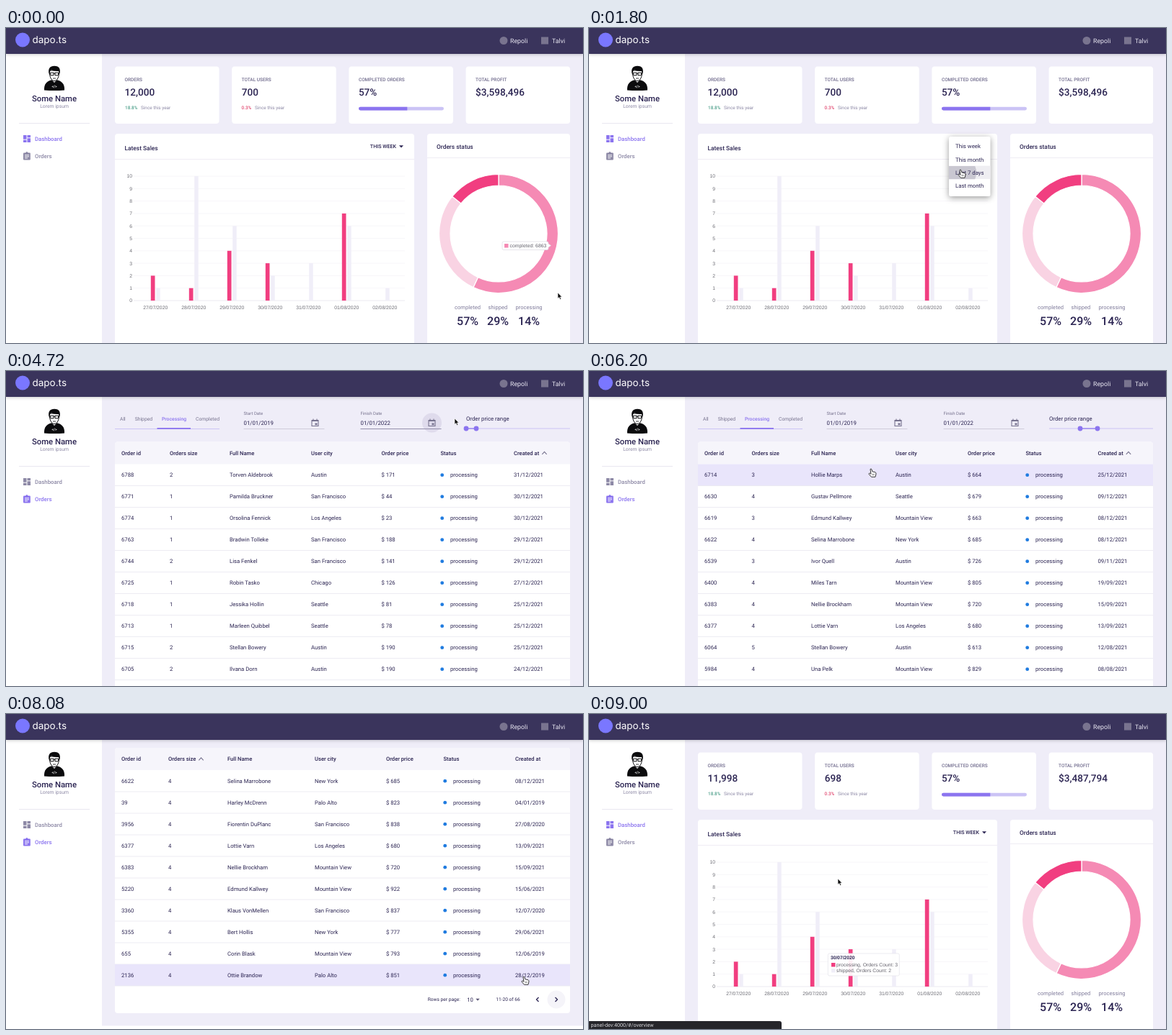
Recreate the animation shown at these times as an HTML page. Size 800 by 438 pixels, loop 9.04 s.

```html
<!DOCTYPE html>
<html lang="en">
<head>
<meta charset="utf-8">
<title>Sales dashboard</title>
<style>
  html, body { margin: 0; width: 100%; height: 100%; overflow: hidden; background: #efedf8; }
  svg { display: block; width: 800px; height: 438px; font-family: Roboto, sans-serif; text-rendering: geometricPrecision; }
  .plain { font-family: "Liberation Sans", sans-serif; }
  .logo { font-family: Inter, sans-serif; }
</style>
</head>
<body>
<svg id="stage" viewBox="0 0 800 438"></svg>
<script>
const LOOP = 9040;
const INK = '#2b2452', MUTED = '#8d89a6', PURPLE = '#8b74ef', PALE = '#cbc3f5';
const PINK = '#f13e80', PINK_MID = '#f58ab4', PINK_PALE = '#f9d3e3', LINE = '#efedf4';
const OPEN_MENU = 1240, PICK = 1700, CLOSE_MENU = 1960;
const TO_ORDERS = 3320, PICK_TAB = 4160, TO_DASHBOARD = 8560;

// Cursor stops: time, x, y
const CURSOR = [
  [0, 765, 368], [360, 765, 368], [800, 640, 250], [1160, 525, 163], [1300, 525, 163],
  [1700, 516, 202], [1900, 516, 202], [2350, 470, 300], [2700, 366, 330], [3080, 130, 230],
  [3260, 52, 180], [3500, 52, 180], [4050, 232, 67], [4250, 232, 67], [4560, 590, 72],
  [4720, 622, 66], [5000, 652, 80], [5100, 652, 80], [5400, 705, 80], [5480, 705, 80],
  [5570, 638, 80], [5600, 638, 80], [5850, 681, 80], [5920, 681, 80], [6200, 392, 141],
  [6500, 248, 114], [6700, 248, 114], [7000, 378, 279], [7450, 378, 279], [7640, 763, 397],
  [7760, 763, 397], [8080, 719, 370], [8460, 52, 154], [8640, 52, 154], [9000, 345, 229], [LOOP, 345, 229]
];

const CITIES = { A: 'Austin', S: 'San Francisco', L: 'Los Angeles', C: 'Chicago', E: 'Seattle', M: 'Mountain View', N: 'New York', P: 'Palo Alto' };
const HEADS = ['Order id', 'Orders size', 'Full Name', 'User city', 'Order price', 'Status', 'Created at'];

const parse = block => block.trim().split('\n').map(line => line.trim().split('|'));
const CHEAP = parse(`
  6788|2|Torven Aldebrook|A|171|31/12/2021
  6771|1|Pamilda Bruckner|S|44|30/12/2021
  6774|1|Orsolina Fennick|L|23|30/12/2021
  6763|1|Bradwin Tolleke|S|188|29/12/2021
  6744|2|Lisa Fenkel|S|141|29/12/2021
  6725|1|Robin Tasko|C|126|27/12/2021
  6718|1|Jessika Hollin|E|81|25/12/2021
  6713|1|Marleen Quibbel|E|78|25/12/2021
  6715|2|Stellan Bowery|A|190|25/12/2021
  6705|2|Ilvana Dorn|A|190|24/12/2021`);
const PRICEY = parse(`
  6714|3|Hollie Marps|A|664|25/12/2021
  6630|4|Gustav Pellmore|E|679|09/12/2021
  6619|3|Edmund Kallwey|M|663|08/12/2021
  6622|4|Selina Marrobone|N|685|08/12/2021
  6539|3|Ivor Quell|A|726|09/11/2021
  6400|4|Miles Tarn|M|805|19/09/2021
  6383|4|Nellie Brockham|M|720|15/09/2021
  6377|4|Lottie Varn|L|680|13/09/2021
  6064|5|Stellan Bowery|A|613|12/08/2021
  5984|4|Una Pelk|M|829|08/08/2021`);
const LARGEST = parse(`
  191|7|Cornelius Quell|S|798|05/02/2019
  1169|6|Weston Drabicek|L|685|17/07/2019
  2224|5|Florentina Bassio|L|705|02/01/2020
  4622|5|Bartholin Weems|E|695|29/01/2021
  5429|5|Sol Hibber|L|687|02/07/2021
  3604|5|Lennor Weems|P|849|01/08/2020
  5949|5|Garvett Solis|N|749|08/08/2021
  281|5|Jed Lomar|M|801|28/02/2019
  6064|5|Stellan Bowery|A|613|12/08/2021
  4403|4|Ingrid Falbert|S|657|28/12/2020`);
const SECOND = parse(`
  6622|4|Selina Marrobone|N|685|08/12/2021
  39|4|Harley McDrenn|P|823|04/01/2019
  3956|4|Fiorentin DuPlanc|S|838|27/08/2020
  6377|4|Lottie Varn|L|680|13/09/2021
  6383|4|Nellie Brockham|M|720|15/09/2021
  5220|4|Edmund Kallwey|M|922|15/06/2021
  3360|4|Klaus VonMellen|S|837|12/07/2020
  5355|4|Bert Hollis|N|777|29/06/2021
  655|4|Corin Blask|M|793|12/06/2019
  2136|4|Ottie Brandow|P|851|28/12/2019`);

const COLS_CHEAP = [160, 227, 310, 423, 520.5, 602.5, 704];
const COLS_PRICEY = [160, 225.5, 308, 425, 525, 605.5, 705.5];
const COLS_SECOND = [160, 225, 307, 428, 527, 606.5, 706];
// Table views: end time, rows, column positions, sorted column
const VIEWS = [
  [PICK_TAB, CHEAP, COLS_CHEAP, 6], [5880, CHEAP, COLS_CHEAP, 6], [6640, PRICEY, COLS_PRICEY, 6],
  [7720, LARGEST, COLS_PRICEY, 1], [LOOP, SECOND, COLS_SECOND, 1]
];

const clamp = v => Math.max(0, Math.min(1, v));
const mix = (a, b, p) => a + (b - a) * p;
const span = (t, a, b) => clamp((t - a) / (b - a));
const smooth = (t, a, b) => { const p = span(t, a, b); return p * p * (3 - 2 * p); };
const within = (t, a, b) => t >= a && t < b;

const rect = (x, y, w, h, fill, r = 0, more = '') => `<rect x="${x}" y="${y}" width="${w}" height="${h}" rx="${r}" fill="${fill}" ${more}/>`;
const circle = (x, y, r, fill, more = '') => `<circle cx="${x}" cy="${y}" r="${r}" fill="${fill}" ${more}/>`;
const path = (d, fill, more = '') => `<path d="${d}" fill="${fill}" ${more}/>`;
const stroke = (d, color, width = 1) => path(d, 'none', `stroke="${color}" stroke-width="${width}"`);
const text = (x, y, size, str, fill = INK, more = '') => `<text x="${x}" y="${y}" font-size="${size}" fill="${fill}" ${more}>${str}</text>`;
const group = (body, more) => `<g ${more}>${body}</g>`;
const BOLD = 'font-weight="500"', MID = 'text-anchor="middle"', PLAIN = 'class="plain"';

function pointer(t) {
  const i = CURSOR.findIndex((c, n) => n && t < c[0]);
  const [t0, x0, y0] = CURSOR[i - 1], [t1, x1, y1] = CURSOR[i];
  const p = smooth(t, t0, t1);
  return { x: mix(x0, x1, p), y: mix(y0, y1, p) };
}

const scrollAt = t => 51.5 * (1 - (1 - span(t, 7050, 7523)) ** 2);

function ring(from, to, fill) {
  const at = (turn, r) => {
    const a = turn * 2 * Math.PI;
    return `${683 + r * Math.sin(a)} ${286 - r * Math.cos(a)}`;
  };
  const big = to - from > .5 ? 1 : 0;
  return path(`M${at(from, 82.5)}A82.5 82.5 0 ${big} 1 ${at(to, 82.5)}L${at(to, 67)}A67 67 0 ${big} 0 ${at(from, 67)}Z`, fill, 'stroke="#fff" stroke-width="1.2"');
}

function statCards(t) {
  const count = (final, gap, k) => {
    const left = t < TO_DASHBOARD ? 0 : gap * 2 ** ((9000 - t) / k);
    return Math.round(Math.max(0, final - left)).toLocaleString('en-US');
  };
  const cards = [['ORDERS', count(12000, 2, 24)], ['TOTAL USERS', count(700, 2, 36)], ['COMPLETED ORDERS', '57%'], ['TOTAL PROFIT', '$' + count(3598496, 111988, 60)]];
  const body = cards.map(([label, value], i) => {
    const x = 151 + 162.2 * i;
    return rect(x, 53.5, 144.5, 79.5, '#fff', 4) + text(x + 13.5, 74, 6.5, label, '#6f6a8c', BOLD) + text(x + 13.5, 93.5, 13.6, value, INK, BOLD);
  }).join('');
  const trend = (x, value, color) => text(x, 113, 6.4, value, color, BOLD) + text(x + 22 - (value.length < 5 ? 3.5 : 0), 113, 6.4, 'Since this year', MUTED);
  return body + trend(165, '18.8%', '#4fa08b') + trend(326.5, '0.3%', '#e0476f')
    + rect(489, 109.7, 118, 4.8, PALE, 2.4) + path('M491.4 109.7H556.3V114.5H491.4A2.4 2.4 0 0 1 491.4 109.7Z', PURPLE);
}

function salesChart(t) {
  const grow = t < TO_DASHBOARD ? 1 : 1 - (1 - span(t, TO_DASHBOARD, 8940)) ** 4;
  const recent = t < TO_DASHBOARD ? smooth(t, 2000, 2400) : 0;
  const week = [[2, 1, 4, 3, 0, 7, 0], [1, 10, 6, 2, 3, 6, 1]];
  const last = [[3, 1, 2, 2, 1, 4, 3], [2, 4, 1, 1, 10, 6, 2]];
  const label = recent ? 'LAST 7 DAYS' : 'THIS WEEK';
  let out = rect(151, 147, 415, 300, '#fff', 4) + text(164.5, 169.5, 8.4, 'Latest Sales', INK, BOLD)
    + text(541, 166.6, 7.1, label, INK, BOLD + ' text-anchor="end"') + path('M545 163.2H551L548 166.4Z', INK) + stroke('M151 182.5H566', LINE);
  for (let i = 0; i <= 10; i++) {
    const y = 379 - 17.3 * i;
    out += stroke(`M177 ${y}H553`, i ? '#f5f4f8' : '#e6e4ec', .8) + text(175, y + 2.4, 6.8, i, '#6d6d75', PLAIN + ' text-anchor="end"');
  }
  for (let i = 0; i < 7; i++) {
    const x = 207.2 + 53 * i, day = 27 + i - (recent ? 3 : 0);
    const date = day > 31 ? `0${day - 31}/08/2020` : `${day}/07/2020`;
    const bar = (s, dx, w, fill) => {
      const h = 17.3 * grow * mix(week[s][i], last[s][i], recent);
      return rect(x + dx, 379 - h, w, h, fill);
    };
    out += bar(0, -6.4, 5.7, PINK) + bar(1, 1, 5.5, '#f0eef8') + text(x, 390.8, 6.8, date, '#6d6d75', PLAIN + ' ' + MID);
  }
  return out;
}

function statusCard(t) {
  const p = t < TO_DASHBOARD ? 1 : 1 - (1 - span(t, TO_DASHBOARD, 8940)) ** 4;
  const parts = [[640, 'completed', '57%'], [682, 'shipped', '29%'], [725, 'processing', '14%']];
  return rect(584, 147, 198, 300, '#fff', 4) + text(597, 168.2, 8.4, 'Orders status', INK, BOLD) + stroke('M584 180.5H782', LINE)
    + ring(0, .57 * p, PINK_MID) + ring(.57 * p, .858 * p, PINK_PALE) + ring(.858 * p, .9999 * p, PINK)
    + parts.map(([x, name, share]) => text(x, 390.5, 7.6, name, '#817d9c', MID) + text(x, 413, 16, share, INK, BOLD + ' ' + MID)).join('');
}

function tooltips(t) {
  const slice = path('M690 297H750Q752 297 752 299V300L755.5 302.5 752 305V306.5Q752 308.5 750 308.5H690Q688 308.5 688 306.5V299Q688 297 690 297Z', '#fff', 'stroke="#dedce4" stroke-width=".7"')
    + rect(691, 300, 5.5, 5.5, PINK_MID) + text(698.5, 305.2, 6.9, 'completed: 6863', '#66646e', PLAIN);
  const bar = rect(331.3, 333, 99, 31, '#fff', 2, 'stroke="#e4e2ea" stroke-width=".7" fill-opacity=".92"')
    + text(335, 341.4, 6.7, '30/07/2020', INK, PLAIN + ' font-weight="700"')
    + rect(336, 346, 5.5, 5.5, PINK) + text(343, 351.4, 6.8, 'processing, Orders Count: 3', '#66646e', PLAIN)
    + rect(336, 354, 5.5, 5.5, '#f0eef8') + text(343, 359.2, 6.8, 'shipped, Orders Count: 2', '#66646e', PLAIN);
  return group(slice, `opacity="${1 - span(t, 380, 520)}"`) + group(bar, `opacity="${span(t, 8860, 8980)}"`);
}

function rangeMenu(t, mouse) {
  if (!within(t, OPEN_MENU, CLOSE_MENU + 120)) return '';
  const fade = span(t, OPEN_MENU, OPEN_MENU + 120) * (1 - span(t, CLOSE_MENU, CLOSE_MENU + 120));
  const hover = Math.max(0, Math.min(3, Math.floor((mouse.y - 155) / 18.3)));
  let out = rect(499, 151, 57.5, 83, '#fff', 2.5, 'style="filter:drop-shadow(0 2px 4px #0006)"') + rect(499, 155 + 18.3 * hover, 57.5, 18.3, '#efeef2');
  if (t > PICK) out += group(circle(516, 201, (t - PICK) * .21, '#c9c7d1'), 'clip-path="inset(0)"').replace('<g', '<svg x="499" y="191.9" width="57.5" height="18.3" viewBox="499 191.9 57.5 18.3"><g') + '</svg>';
  ['This week', 'This month', 'Last 7 days', 'Last month'].forEach((item, i) => { out += text(508, 167.2 + 18.3 * i, 7.8, item); });
  return group(out, `opacity="${fade}"`);
}

function filters(t) {
  const tabs = [[158, 'All'], [178.7, 'Shipped'], [216, 'Processing'], [263, 'Completed']];
  const active = t < PICK_TAB ? 0 : 2, slide = smooth(t, PICK_TAB, PICK_TAB + 200);
  const glow = span(t, 4460, 4560) * (1 - span(t, 4760, 4880));
  const low = mix(638, 681, smooth(t, 5600, 5850)), high = mix(652, 705, smooth(t, 5100, 5400));
  const date = (x, label, value) => text(x, 60.8, 6, label, '#77738f') + text(x, 74.6, 7.8, value) + stroke(`M${x} 80.5H${x + 112}`, '#cfccdb')
    + stroke(`M${x + 94.5} 68.5H${x + 103.5}V76.5H${x + 94.5}ZM${x + 94.5} 69.5H${x + 103.5}M${x + 96.5} 66.5V68M${x + 101.5} 66.5V68`, '#77738f', 1.1) + rect(x + 99, 72.5, 3, 2.7, '#77738f');
  return tabs.map(([x, name], i) => text(x, 69.3, 6.8, name, i === active ? PURPLE : '#77738f', i === active ? BOLD : '')).join('')
    + stroke('M151 80.5H296', PALE) + rect(mix(151, 209.5, slide), 79, mix(21, 46.5, slide), 1.8, PURPLE)
    + circle(590.5, 72, 13.5, '#dfdbec', `opacity="${glow}"`) + date(329.5, 'Start Date', '01/01/2019') + date(491.5, 'Finish Date', '01/01/2022')
    + (glow ? stroke('M491.5 80.5H603.5', '#9590ac') : '')
    + text(638, 68.8, 7.8, 'Order price range') + stroke('M638 80H782', PALE, 1.2) + stroke(`M${low} 80H${high}`, PURPLE, 1.2)
    + circle(low, 80, 3.4, PURPLE) + circle(high, 80, 3.4, PURPLE);
}

function ordersPage(t, mouse) {
  const [, rows, cols, sorted] = VIEWS.find(v => t < v[0]);
  const scroll = scrollAt(t);
  const onTable = mouse.x > 151 && mouse.x < 782;
  const hover = onTable ? Math.floor((mouse.y + (t < 7450 ? 0 : scroll) - 129.5) / 30) : -1;
  let out = filters(t) + rect(151, 98.5, 631, 369, '#fff', 4) + path('M151 129.5V102.5Q151 98.5 155 98.5H778Q782 98.5 782 102.5V129.5Z', '#f6f5fb');
  HEADS.forEach((head, i) => { out += text(cols[i], 116.8, 7.6, head, INK, BOLD); });
  const arrow = cols[sorted] + (sorted === 1 ? 45.5 : 42.5);
  out += stroke(`M${arrow - 3.2} 115.8L${arrow} 112.4 ${arrow + 3.2} 115.8`, '#77738f', 1.1);
  rows.forEach(([id, size, name, city, price, date], i) => {
    const y = 129.5 + 30 * i;
    const kind = t < PICK_TAB ? (i * 2 + 1) % 3 : 0;
    if (i === hover) out += rect(151, y, 631, 30, '#e9e5fb');
    [id, size, name, CITIES[city], '$ ' + price, , date].forEach((cell, c) => { out += text(cols[c], y + 17.7, 7.7, cell); });
    out += circle(cols[5] + 2.2, y + 15.2, 2.4, ['#1f7be0', '#45a35a', '#f0a03c'][kind])
      + text(cols[5] + 13.5, y + 17.7, 7.7, ['processing', 'completed', 'shipped'][kind]) + stroke(`M151 ${y + 30}H782`, '#e9e7f0', .8);
  });
  const second = rows === SECOND, dx = second ? -3.7 : 0;
  const chevron = (x, dir, color) => stroke(`M${x - 1.5 * dir} 445.5L${x + 1.5 * dir} 448.5 ${x - 1.5 * dir} 451.5`, color, 1.3);
  out += text(588.5 + dx, 450.8, 6.6, 'Rows per page:') + text(643 + dx, 451.2, 7.7, '10') + path(`M${655 + dx} 447.2h5.4l-2.7 3Z`, '#5b5675')
    + text(683 + dx, 450.8, 6.6, second ? '11-20 of 66' : '1-10 of 66') + (t > 7600 ? circle(763, 448.5, 12.5, '#f5f4f9') : '')
    + chevron(737, -1, second ? INK : '#bdbac8') + chevron(763, 1, INK) + rect(133, 485, 667, 40, '#fff');
  const bar = span(t, 7050, 7100) * (1 - span(t, 7620, 7740));
  return group(out, `transform="translate(0 ${-scroll})"`) + rect(795, 38 + (scroll - 42) * .15, 4, 390, '#737378', 2, `opacity="${bar}"`);
}

function avatar() {
  return path('M53 86.5C52.4 77 57.5 74 63 72.3H71C76.5 74 81.6 77 81 86.5Q67 87.6 53 86.5Z', '#0b0b0d') + path('M63 71.5L67 76 71 71.5Z', '#fff')
    + path('M60.3 59C60 68 63 73.5 67 73.5S74 68 73.7 59Z', '#fff', 'stroke="#0b0b0d"')
    + path('M59.6 64C58 56 61 53 67 52.8C74 53 76 57 74.4 64L73.2 60Q66 60.5 63 58.3Q61 59.5 60.8 61Z', '#0b0b0d')
    + stroke('M61.3 62.2H66V65.8H62Q61.3 65.8 61.3 62.2ZM68 62.2H72.7Q72.7 65.8 72 65.8H68ZM66 63H68', '#0b0b0d') + stroke('M65 70H69', '#0b0b0d', .8)
    + text(67, 82.8, 5, '&lt;/&gt;', '#fff', MID + ' font-weight="700"');
}

function chrome(t, onOrders) {
  const dash = onOrders ? MUTED : PURPLE, list = onOrders ? PURPLE : MUTED;
  return rect(0, 36, 133, 402, '#fff') + avatar() + text(67, 101.6, 11.3, 'Some Name', INK, BOLD + ' ' + MID) + text(67, 111.4, 6.8, 'Lorem ipsum', MUTED, MID) + stroke('M18 132.5H116', '#e9e7f0')
    + rect(24, 149, 4.5, 5.7, dash) + rect(24, 155.7, 4.5, 3.3, dash) + rect(29.5, 149, 4.5, 3.3, dash) + rect(29.5, 153.3, 4.5, 5.7, dash) + text(40, 156.8, 7.8, 'Dashboard', dash, BOLD)
    + rect(24, 173.5, 9.8, 10, list, 1) + circle(28.9, 173.6, 1.5, list) + stroke('M26 176.7H32M26 178.8H32M26 180.9H30', '#fff', .9) + text(40, 181.2, 7.8, 'Orders', list, BOLD)
    + rect(0, 0, 800, 36, '#3a345c', 0, 'style="filter:drop-shadow(0 1px 2px #0003)"')
    + circle(23, 16.5, 10, '#7a77ff') + text(36.5, 21, 13.5, 'dapo.ts', '#fff', 'class="logo"')
    + circle(690, 17.5, 5.5, '#79748f') + text(699, 20.6, 8.8, 'Repoli', '#e9e7f2') + rect(742, 12.5, 10, 10, '#79748f') + text(757, 20.6, 8.8, 'Talvi', '#e9e7f2');
}

function statusBar(t) {
  const page = within(t, 3200, 4080) ? 'orders' : t >= 8420 ? 'overview' : '';
  return page && path('M0 427H264Q267 427 267 430V438H0Z', '#25252a') + text(2.5, 435, 7.2, 'panel-dev:4000/#/' + page, '#d6d6da');
}

function cursor(t, { x, y }, onOrders) {
  const overTable = onOrders && x > 151 && x < 782 && y > 98;
  const overLink = x > 20 && x < 116 && y > 145 && y < 188;
  const overTab = onOrders && x > 151 && x < 296 && y > 52 && y < 82;
  const overMenu = within(t, 1100, CLOSE_MENU) && x < 560;
  const shape = overTable || overLink || overTab || overMenu
    ? path('M-2 -4.5Q-.8 -5.6 0 -4.2L.8 -1.2 5 -.2Q6.2 .4 6 2L5 6.3H-.5L-4 2.2Q-4 .8 -2.4 1.2L-1 2.3Z', '#fff', 'stroke="#222" stroke-width=".9" stroke-linejoin="round"') + stroke('M1.2 1.8V4.2M3 1.8V4.2', '#222', .6)
    : path('M0 0V8.2L1.9 6.5 3.3 9.4 4.7 8.8 3.4 6H5.8Z', '#111', 'stroke="#fff" stroke-width=".6"');
  return group(shape, `transform="translate(${x} ${y})"`);
}

function scene(t) {
  const mouse = pointer(t), onOrders = within(t, TO_ORDERS, TO_DASHBOARD);
  const page = onOrders ? ordersPage(t, mouse) : statCards(t) + salesChart(t) + statusCard(t) + tooltips(t) + rangeMenu(t, mouse);
  return rect(0, 0, 800, 438, '#efedf8') + page + chrome(t, onOrders) + statusBar(t) + cursor(t, mouse, onOrders);
}

const stage = document.getElementById('stage');
const start = performance.now();
function draw() {
  stage.innerHTML = scene((performance.now() - start) % LOOP);
  requestAnimationFrame(draw);
}
draw();
</script>
</body>
</html>
```
